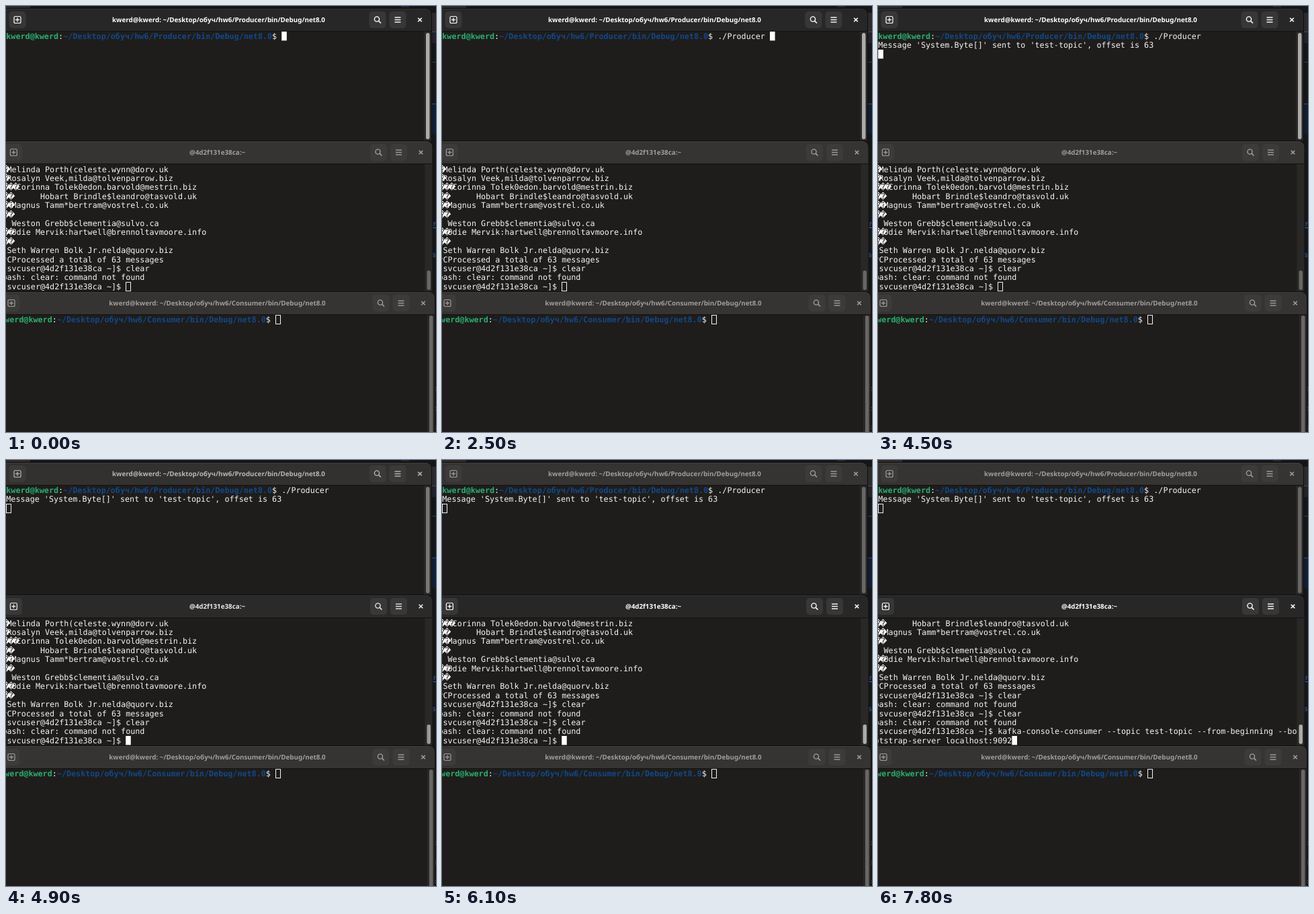
An HTML page with a canvas that plays this animation: 640x633 px, repeating every 8 s.

```html
<!DOCTYPE html>
<html lang="en">
<head>
<meta charset="utf-8">
<title>Three terminals</title>
<style>
  html, body { margin: 0; width: 100%; height: 100%; overflow: hidden; background: #15161a; }
  canvas { display: block; }
</style>
</head>
<body>
<canvas id="stage" width="640" height="633"></canvas>
<script>
const ctx = document.getElementById('stage').getContext('2d');
ctx.textRendering = 'geometricPrecision';

const LOOP = 8000, FOCUS = 4800;
const CELL = 7.068, ROW = 13.4, ROWS = 14;
const MONO = '11.74px "DejaVu Sans Mono", monospace';
const WHITE = '#f4f4f2', GREEN = '#2bae70', BLUE = '#12488b', BODY = '#1e1d1b';

const USER = 'kwerd@kwerd';
const path = app => `~/Desktop/обуч/hw6/${app}/bin/Debug/net8.0`;
const prompt = app => [[USER, GREEN, true], [':', WHITE], [path(app), BLUE, true], ['$ ', WHITE]];
const plain = text => [[text, WHITE]];

const SHELL = '[svcuser@4d2f131e38ca ~]$ ';
const MISSING = 'bash: clear: command not found';
const LOG = [
  '\uFFFDMelinda Porth(celeste.wynn@dorv.uk',
  '\uFFFDRosalyn Veek,milda@tolvenparrow.biz',
  '\uFFFD\uFFFD\uFFFDCorinna Tolek0edon.barvold@mestrin.biz',
  '\uFFFD\uFFFD      Hobart Brindle$leandro@tasvold.uk',
  '\uFFFD\uFFFDMagnus Tamm*bertram@vostrel.co.uk',
  '\uFFFD\uFFFD',
  '  Weston Grebb$clementia@sulvo.ca',
  '\uFFFD\uFFFDOdie Mervik:hartwell@brennoltavmoore.info',
  '\uFFFD\uFFFD',
  ' Seth Warren Bolk Jr.nelda@quorv.biz',
  '^CProcessed a total of 63 messages',
  SHELL + 'clear',
  MISSING
];
const AGAIN = [...LOG, SHELL + 'clear', MISSING];
const CONSUME = SHELL + 'kafka-console-consumer --topic test-topic --from-beginning --bo';

// Each step holds from its time until the next one.
const producer = [
  [0, ['']],
  [1400, ['./Pro']],
  [2400, ['./Producer ']],
  [3100, ['./Producer', '']],
  [4500, ['./Producer', "Message 'System.Byte[]' sent to 'test-topic', offset is 63", '']]
];
const broker = [
  [0, [...LOG, SHELL]],
  [5600, [...LOG, SHELL + 'clear']],
  [6100, [...AGAIN, SHELL]],
  [6800, [...AGAIN, SHELL + 'clear']],
  [7800, [...AGAIN, CONSUME, 'otstrap-server localhost:9092']]
];
const producerBlink = [[0, 1], [300, 0], [900, 1], [1900, 0], [2400, 1], [3000, 0], [3100, 1], [3700, 0], [4300, 1]];
const brokerBlink = [[0, 1], [5400, 0], [5600, 1], [6600, 0], [6800, 1], [7600, 0], [7800, 1]];

const at = (steps, t) => steps.filter(s => s[0] <= t).pop()[1];
const mix = (a, b, k) => `rgb(${a.map((v, i) => Math.round(v + (b[i] - v) * k))})`;

function rect(color, x, y, w, h, r = 0) {
  ctx.fillStyle = color;
  ctx.beginPath();
  ctx.roundRect(x, y, w, h, r);
  ctx.fill();
}

function line(points, width) {
  ctx.lineWidth = width;
  ctx.beginPath();
  points.forEach(([x, y], i) => i ? ctx.lineTo(x, y) : ctx.moveTo(x, y));
  ctx.stroke();
}

const icons = {
  plus(x, y) {
    ctx.lineWidth = 1.2;
    ctx.beginPath();
    ctx.roundRect(x - 5, y - 5, 10, 10, 2);
    ctx.stroke();
    line([[x - 3, y], [x + 3, y]], 1.3);
    line([[x, y - 3], [x, y + 3]], 1.3);
  },
  search(x, y) {
    ctx.lineWidth = 1.4;
    ctx.beginPath();
    ctx.arc(x - 1, y - 1, 3.6, 0, 7);
    ctx.stroke();
    line([[x + 1.6, y + 1.6], [x + 5, y + 5]], 1.6);
  },
  menu(x, y) {
    for (const d of [-3.5, 0, 3.5]) line([[x - 4.5, y + d], [x + 4.5, y + d]], 1.4);
  },
  close(x, y) {
    line([[x - 2.8, y - 2.8], [x + 2.8, y + 2.8]], 1.6);
    line([[x + 2.8, y - 2.8], [x - 2.8, y + 2.8]], 1.6);
  }
};

function frame({ left, right, top, bottom, title, thumb }, focus) {
  const mid = top + 16.5;
  const ink = mix([160, 158, 156], [255, 255, 255], focus);
  const button = mix([60, 59, 57], [56, 55, 56], focus);
  rect('#0e0e0f', left, top - 1, right - left + 1, bottom - top + 1, [0, 9, 0, 0]);
  rect(mix([53, 52, 50], [40, 39, 40], focus), left, top, right - left, 34, [0, 8, 0, 0]);
  rect('rgba(255,255,255,.06)', left, top, right - left - 6, 1);
  rect(BODY, left, top + 33, right - left, bottom - top - 33);
  rect('#121211', left, top + 33, right - left, 1);
  rect('#292826', right - 11, top + 34, 11, bottom - top - 34);
  rect(mix([104, 103, 102], [172, 171, 169], focus), right - 8, thumb[0], 5.5, thumb[1] - thumb[0], 3);

  ctx.strokeStyle = ink;
  const spots = [['plus', left + 17], ['search', right - 80], ['menu', right - 50], ['close', right - 17]];
  for (const [name, x] of spots) {
    if (name !== 'close') rect(button, x - 12.5, mid - 12.5, 25, 25, 5);
    icons[name](x, mid);
  }
  ctx.fillStyle = ink;
  ctx.font = 'bold 9.8px "Noto Sans", sans-serif';
  ctx.textAlign = 'center';
  ctx.fillText(title, (left + right) / 2, mid + 3.3);
  ctx.textAlign = 'left';
}

// Draws one row on the character grid and returns the column after it.
function row(parts, left, y) {
  let col = 0;
  for (const [text, color, bold] of parts) {
    ctx.fillStyle = color;
    for (const ch of text) {
      ctx.font = ch === '\uFFFD' ? '11.74px "DejaVu Sans", sans-serif' : (bold ? 'bold ' : '') + MONO;
      if (ch !== ' ') ctx.fillText(ch, left + col * CELL, y + 10.8);
      col++;
    }
  }
  return col;
}

function cursor(col, left, y, solid, visible) {
  const x = left + col * CELL;
  if (!solid) {
    ctx.strokeStyle = WHITE;
    ctx.lineWidth = 1;
    ctx.strokeRect(Math.round(x) + .5, Math.round(y) + .5, 7, 13);
  } else if (visible) {
    rect('#ffffff', x, y, 7.6, ROW);
  }
}

function screen(lines, left, y, solid, visible) {
  let col = 0;
  lines.forEach((parts, i) => { col = row(parts, left, y + i * ROW); });
  cursor(col, left, y + (lines.length - 1) * ROW, solid, visible);
}

function desktop() {
  rect('#15161a', 0, 0, 640, 633);
  rect('#2c2c2d', 0, 0, 36, 4);
  rect('#1b2a40', 588, 0, 12, 2);
  rect('#2b2b2e', 633, 10, 7, 28);
  rect('#4a4a4c', 633, 38, 7, 1);
  rect('#22232a', 633, 39, 7, 16);
  rect('#27405f', 633, 83, 7, 1);
  rect('#101d33', 633, 145, 7, 45);
  rect('#24508a', 633, 145, 7, 1);
  ctx.font = '10px "DejaVu Sans Mono", monospace';
  ctx.fillStyle = '#2d6cb5';
  ctx.fillText('r', 635, 327);
  ctx.fillText('s.', 634, 373);
  rect('#2d6cb5', 635, 329, 5, 1);
  ctx.fillStyle = '#77777a';
  for (const y of [572, 601, 629]) ctx.fillText(':', 636, y);
}

const windows = [
  { left: 0, right: 633, top: 4, bottom: 200, title: `${USER}: ${path('Producer')}`, thumb: [40, 198] },
  { left: -5.6, right: 634.5, top: 201, bottom: 424, title: '@4d2f131e38ca:~', thumb: [393, 422] },
  { left: -9, right: 638, top: 425, bottom: 640, title: `${USER}: ${path('Consumer')}`, thumb: [460, 640] }
];

function draw(t) {
  const moved = t >= FOCUS;
  const k = moved ? Math.min(1, (t - FOCUS + 50) / 300) : 0;
  const shift = k * (2 - k);
  const [top, middle, low] = windows;

  desktop();
  frame(top, 1 - shift);
  const [command, ...output] = at(producer, t);
  screen([[...prompt('Producer'), [command, WHITE]], ...output.map(plain)],
    top.left + .3, 38, !moved, at(producerBlink, t));

  frame(middle, shift);
  screen(at(broker, t).slice(-ROWS).map(plain), middle.left, 235.8, moved, at(brokerBlink, t));

  frame(low, 0);
  screen([prompt('Consumer')], low.left, 459, false, true);
}

function tick() {
  draw(performance.now() % LOOP);
  requestAnimationFrame(tick);
}
tick();
</script>
</body>
</html>
```
